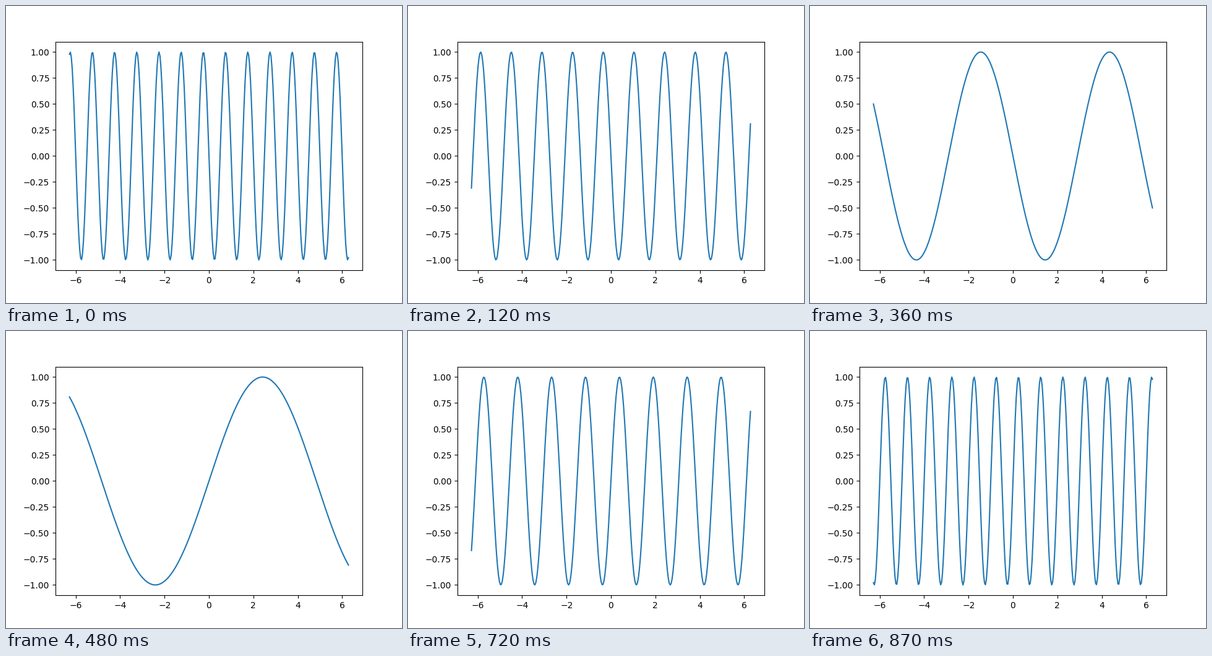
A matplotlib script for the animation above (0.9 s loop, 640 by 480 pixels).

```python
import numpy as np
import matplotlib.pyplot as plt
from matplotlib.animation import FuncAnimation

FRAMES = 30
INTERVAL = 30

x = np.linspace(-2 * np.pi, 2 * np.pi, 300)
freqs = np.linspace(-2 * np.pi, 2 * np.pi, FRAMES)

fig, ax = plt.subplots(figsize=(6.4, 4.8), dpi=100)


def draw(i):
    # Redrawing lets the y range follow the wave's actual height.
    ax.clear()
    return ax.plot(x, np.sin(freqs[i] * x), color="C0", lw=1.5)


anim = FuncAnimation(fig, draw, frames=FRAMES, interval=INTERVAL,
                     repeat=True, repeat_delay=0, blit=False)
plt.show()
```
